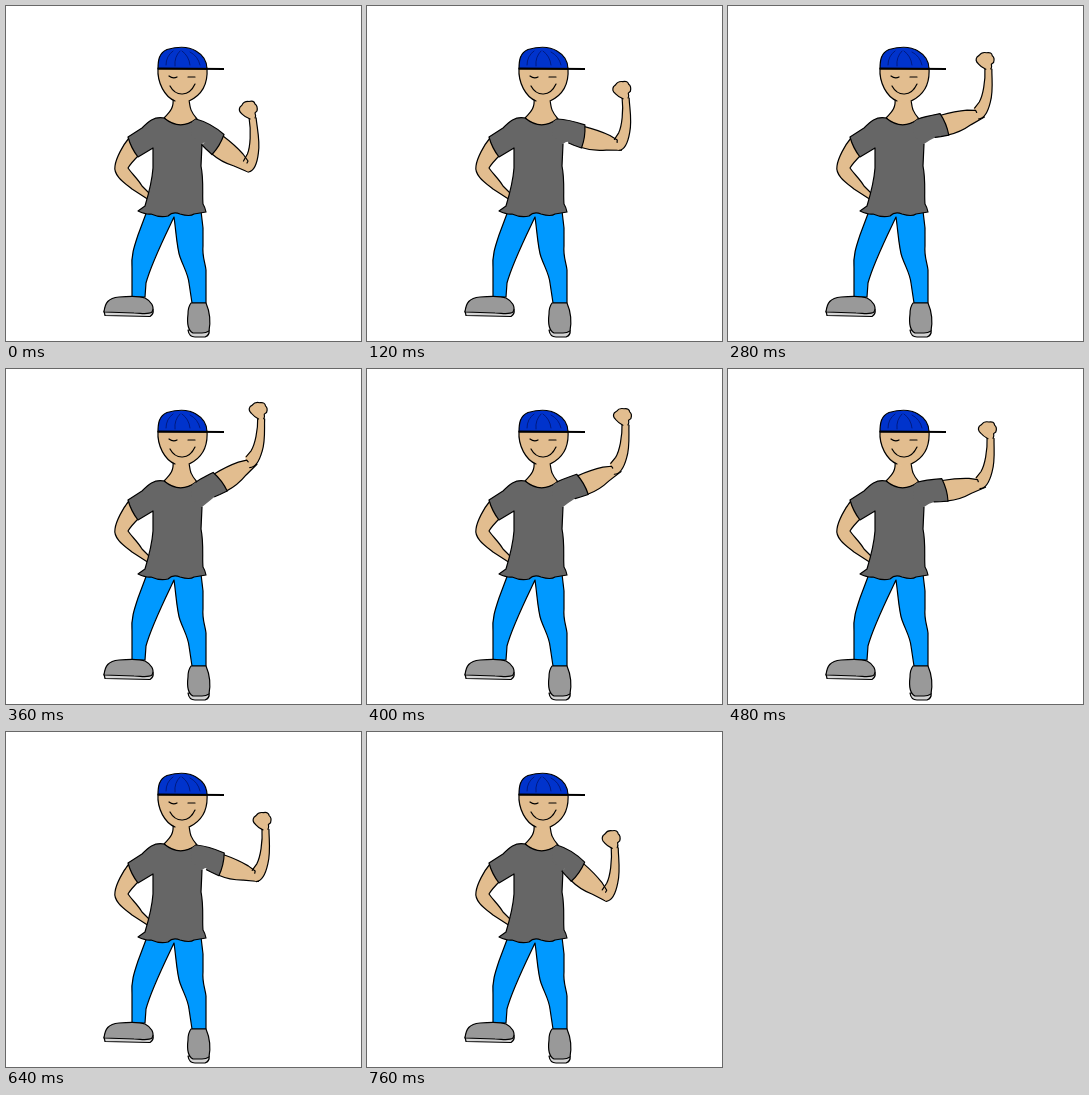
An HTML page for the animation above (0.8 s loop, 355 by 335 pixels).

```html
<!DOCTYPE html>
<html lang="en">
<head>
<meta charset="utf-8">
<title>Raised fist</title>
<style>
  html, body { margin: 0; width: 100%; height: 100%; overflow: hidden; background: #fff; }
  svg { display: block; width: 355px; height: 335px; }
  path { stroke: #000; stroke-width: 1.2; stroke-linecap: round; stroke-linejoin: round; fill: none; }
  .skin { fill: #e2bd8f; }
  .shirt { fill: #666; }
  .jeans { fill: #09f; }
  .shoe { fill: #999; }
  .sole { fill: #d4d4d4; }
  .cap { fill: #0033cc; }
  .bare { stroke: none; }
  .thin { stroke: #001a80; stroke-width: 1; }
  .brim { stroke-width: 2; stroke-linecap: butt; }
</style>
</head>
<body>
<svg viewBox="0 0 355 335">
  <!-- legs and shoes -->
  <path class="jeans" d="M141 205L132 229C128 241 125 250 126 262L126 291L139 291L140 277C145 258 158 232 168 211C170 225 171 243 174 251C178 262 182 268 183 277L186 297L200 297L200 264C199 256 196 250 197 240L197 222L195 205Z"/>
  <path class="sole" d="M98 305L99 309.5L144 310.5Q148 308 147 303Z"/>
  <path class="shoe" d="M98 306C99 297 102 292 113 291C124 290 134 290 139 292C145 295 149 301 146 306C142 309 135 307 128 307Z"/>
  <path class="sole" d="M182 324Q183 331 189 331L199 331Q204 329 203 324Z"/>
  <path class="shoe" d="M185 297L200 297C203 304 205 314 203 325Q200 327 196 327L187 327C181 324 181 316 182 308Q182 301 185 297Z"/>

  <!-- arm on the hip -->
  <path class="skin" d="M123 132C117 139 110 152 109 160C107 170 120 178 126 183L143 194L143 187L136 180C132 173 126 168 122 162C125 157 129 153 133 149Z"/>

  <!-- neck and head -->
  <path class="skin" d="M167 92C168 101 165 105 158 112Q174 127 191 113C185 106 184 103 183 93Z"/>
  <path class="skin bare" d="M152 62C151 77 159 91 168 94C173 98 180 97 184 95C196 89 202 77 201 62Z"/>
  <path d="M152 62C151 77 159 91 169 95M183 95C196 89 202 77 201 62"/>
  <path d="M163 70Q167 73 171 71M182 71L189 71M164 80C170 91 183 91 189 78"/>
  <path class="cap" d="M152 63C152 54 153 47 161 43.5C170 41 182 40 190 45C197 49 201 56 201 63Z"/>
  <path class="thin" d="M160 59Q160 50 167 45M169 60Q168 51 174 45M176 45Q183 50 184 59M184 46Q192 50 194 59"/>
  <path class="brim" d="M152 62.5L218 63"/>

  <!-- raised arm -->
  <g id="upper">
    <path class="skin bare" d="M208 128L217 130Q229 139 237 148L247 160L242 166Q235 163 228 160Q215 156 206 148Z"/>
    <path d="M206 148Q215 156 228 160Q235 163 242 166"/>
  </g>
  <g id="fore">
    <path class="skin bare" d="M1 -48C3 -34 2 -18 -1 -11L-6 -4L-3 5L0 7C6 6 9 -4 10 -12C12 -24 9 -36 8 -48Z"/>
    <path d="M1 -47C3 -34 2 -18 -1 -11L-5 -4M0 7C6 6 9 -4 10 -12C12 -24 9 -36 8 -47"/>
    <path class="skin" d="M2 -46Q-3 -48 -6 -51Q-10 -54 -8 -58L-6 -60Q-4 -64 1 -63.5Q6 -65 7 -61Q10 -59 9 -54L7 -52Q8 -49 7 -47"/>
  </g>
  <g id="crease"><path d="M217 130Q229 139 237 148L242 155L241 157"/></g>

  <!-- shirt -->
  <path class="shirt bare" d="M158 112C148 110 142 116 136 122L122 131Q125 142 132 151L147 142L147 162C146 176 142 190 139 200L132 205Q141 209 145 208Q154 212 162 210Q167 205 174 208Q184 211 188 208L200 206Q199 201 197 198C196 188 198 175 195 160L196 138L191 113Q174 125 158 112Z"/>
  <path d="M190 113Q174 125 158 112C148 110 142 116 136 122L122 131Q125 142 132 151L147 142L147 162C146 176 142 190 139 200L132 205Q141 209 145 208Q154 212 162 210Q167 205 174 208Q184 211 188 208L200 206Q199 201 197 198C196 188 198 175 195 160L196 138"/>
  <path id="sleeve" class="shirt bare"/>
  <path id="seam"/>
</svg>
<script>
  const STEP = 40, COUNT = 20, PEAK = 9;
  const shoulder = { x: 194, y: 124 };
  const byId = id => document.getElementById(id);
  const [upper, fore, crease, sleeve, seam] =
    ['upper', 'fore', 'crease', 'sleeve', 'seam'].map(byId);
  const mix = (a, b, t) => a + (b - a) * t;

  // Rotate a point of the resting pose around the shoulder.
  function turn(x, y, deg) {
    const a = deg * Math.PI / 180, c = Math.cos(a), s = Math.sin(a);
    const dx = x - shoulder.x, dy = y - shoulder.y;
    return [shoulder.x + dx * c - dy * s, shoulder.y + dx * s + dy * c];
  }

  function angles(step) {
    if (step <= PEAK) {
      const t = step / PEAK;
      return [mix(0, -68, t), mix(-0.5, 8, t)];
    }
    const t = (step - PEAK) / (COUNT - 1 - PEAK);
    return [mix(-68, 4, t), mix(8, 4, t)];
  }

  function pose(step) {
    const [swing, tilt] = angles(step);
    const at = (x, y) => turn(x, y, swing).map(v => v.toFixed(2)).join(' ');
    const spin = `rotate(${swing} ${shoulder.x} ${shoulder.y})`;
    const reach = 1 + swing * 0.001; // the forearm shortens as it rises
    upper.setAttribute('transform', spin);
    crease.setAttribute('transform', spin);
    fore.setAttribute('transform',
      `translate(${at(242.5, 159)}) rotate(${tilt}) scale(1 ${reach})`);

    const edge = `M190 113Q${at(205, 117)} ${at(218, 128.5)}` +
      `Q${at(214, 140)} ${at(206, 148.5)}L${at(200, 143)}L${at(196, 139)}`;
    seam.setAttribute('d', edge);
    sleeve.setAttribute('d', `${edge}Q201 134 196 138L185 130L186 116Z`);
  }

  const start = performance.now();
  function tick() {
    pose(Math.floor((performance.now() - start) / STEP) % COUNT);
    requestAnimationFrame(tick);
  }
  pose(0);
  requestAnimationFrame(tick);
</script>
</body>
</html>
```
